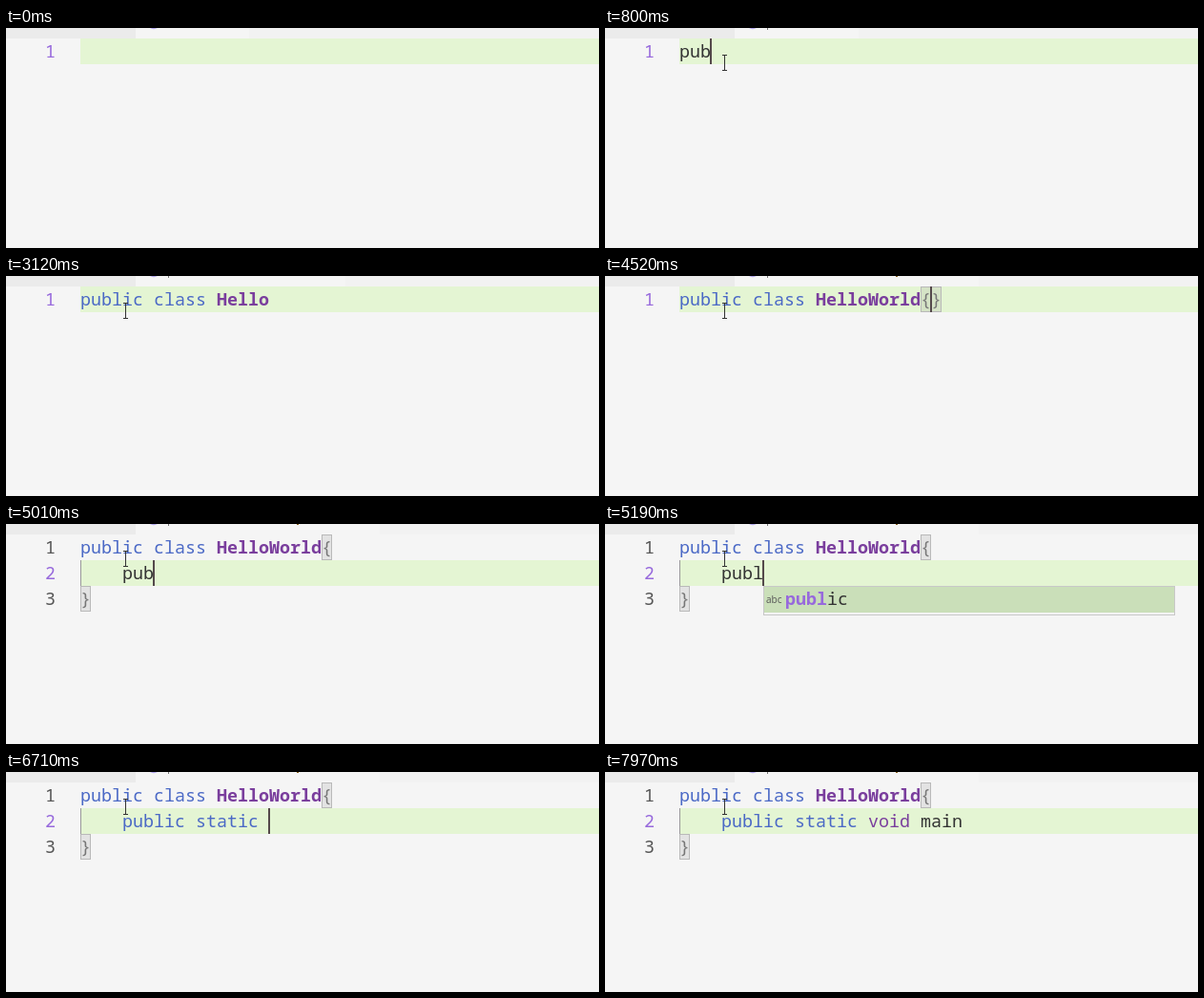
Write an HTML page with a canvas that moves like this. It is 622 px wide and 231 px high and loops after 8 s.

```html
<!DOCTYPE html>
<html lang="en">
<head>
<meta charset="utf-8">
<title>Typing a Java class</title>
<style>
  html, body { margin: 0; width: 100%; height: 100%; overflow: hidden; background: #f5f5f5; }
  canvas { display: block; }
</style>
</head>
<body>
<canvas id="stage" width="622" height="231"></canvas>
<script>
const ctx = document.getElementById("stage").getContext("2d");
const LOOP = 8000, W = 622, H = 231;
const CELL = 11, ROW = 27, LEFT = 78, TOP = 11;
const MONO = '18.33px "Noto Sans Mono", "DejaVu Sans Mono", monospace';
const color = {
  bg: "#f5f5f5", line: "#e4f5d3", text: "#333333", keyword: "#4b69c6",
  type: "#7a3e9d", accent: "#9769dc", brace: "#777777", number: "#555555"
};

const header = "public class HelloWorld";
const headerKeys = [540, 640, 750, 860, 970, 1090, 1340, 1480, 1600, 1760, 1940, 2000,
  2230, 2290, 2370, 2450, 2530, 2610, 3180, 3310, 3480, 3600, 3740];
const method = "public static void main";
const methodKeys = [4790, 4870, 4960, 5080, 5280, 5370, 5650, 5760, 5870, 5960, 6070, 6170, 6290,
  6680, 6900, 7000, 7090, 7180, 7400, 7650, 7730, 7800, 7880];
const OPEN = 4480, CLOSE = 4520, ENTER = 4670;

// start column, end column, time the colour applies, colour, bold
const headerStyles = [[0, 6, 1210, color.keyword], [7, 12, 2170, color.keyword],
  [13, 23, 0, color.type, true]];
const methodStyles = [[0, 6, 5440, color.keyword], [7, 13, 6500, color.keyword],
  [14, 18, 7290, color.type]];
const caretHidden = [[0, 480], [3120, 3180], [4300, 4480], [7970, LOOP]];

const within = (t, a, b) => t >= a && t < b;
const typed = (keys, t) => keys.filter(k => k <= t).length;
const rowTop = row => TOP + row * ROW;

function rect(x, y, w, h, fill) {
  ctx.fillStyle = fill;
  ctx.fillRect(x, y, w, h);
}

function write(text, x, row, fill, bold) {
  ctx.font = (bold ? "bold " : "") + MONO;
  ctx.fillStyle = fill;
  [...text].forEach((ch, i) => ctx.fillText(ch, x + i * CELL, rowTop(row) + 20));
}

function writeStyled(text, x, row, styles, t) {
  [...text].forEach((ch, i) => {
    const s = styles.find(([a, b, at]) => within(i, a, b) && t >= at);
    write(ch, x + i * CELL, row, s ? s[3] : color.text, s && s[4]);
  });
}

function brace(ch, x, row) {
  rect(x, rowTop(row), CELL, ROW, "rgba(110,110,110,.13)");
  ctx.strokeStyle = "#b9b9b9";
  ctx.lineWidth = 1;
  ctx.strokeRect(x + .5, rowTop(row) + .5, CELL - 1, ROW - 1);
  write(ch, x, row, color.brace);
}

function drawTabs(t, count) {
  const chars = count + (t >= OPEN);
  rect(0, 0, W, TOP, "#f2f2f2");
  rect(0, 0, 136, TOP, "#ebebeb");
  rect(136, 0, 119 + Math.max(0, chars * 6 - 7), TOP, color.bg);
  ctx.strokeStyle = "#b5aaf0";
  ctx.lineWidth = 1.3;
  ctx.beginPath();
  ctx.arc(155, -6, 6.5, .2, Math.PI - .2);
  ctx.stroke();
  if (count) rect(170, 0, 1, 2, "#777777");
  if (t >= OPEN) rect(305, 0, 2, 1, "#8a6420");
}

function drawPopup(x, count) {
  const y = rowTop(2);
  rect(x, y, 432, 31, "#c8c8c8");
  rect(x + 1, y + 1, 430, 29, "#f3f3f3");
  rect(x + 1, y + 1, 430, 27, "#cadfb9");
  ctx.font = '10px "Open Sans", sans-serif';
  ctx.fillStyle = "#555555";
  ctx.fillText("abc", x + 3, y + 18);
  const word = method.slice(0, 6);
  write(word.slice(0, count), x + 23, 2, color.accent, true);
  write(word.slice(count), x + 23 + count * CELL, 2, color.text);
}

function drawPointer(t) {
  if (t < 20) return;
  const p = Math.min(1, (t - 20) / 480);
  const rest = (1 - p) ** 2 * (1 + 2 * p);
  const x = Math.round(125 + 82 * rest) + .5, y = Math.round(36 + 141 * rest);
  ctx.strokeStyle = "#333333";
  ctx.lineWidth = 1;
  ctx.beginPath();
  ctx.moveTo(x, y - 7);
  ctx.lineTo(x, y + 8);
  for (const edge of [y - 7.5, y + 8.5]) {
    ctx.moveTo(x - 2.5, edge);
    ctx.lineTo(x + 2.5, edge);
  }
  ctx.stroke();
}

function draw(t) {
  const first = typed(headerKeys, t), second = typed(methodKeys, t);
  const split = t >= ENTER, active = split ? 1 : 0;
  const braceX = LEFT + header.length * CELL, indentX = LEFT + 4 * CELL;
  const caretX = split ? indentX + second * CELL : LEFT + (first + (t >= OPEN)) * CELL;

  rect(0, 0, W, H, color.bg);
  drawTabs(t, first);
  rect(LEFT, rowTop(active), W - LEFT, ROW, color.line);
  for (let row = 0; row < (split ? 3 : 1); row++)
    write(String(row + 1), 41, row, row === active ? color.accent : color.number);

  writeStyled(header.slice(0, first), LEFT, 0, headerStyles, t);
  if (t >= OPEN) brace("{", braceX, 0);
  if (within(t, CLOSE, ENTER)) brace("}", braceX + CELL, 0);
  if (split) {
    rect(LEFT, rowTop(1), 1, ROW, "#999999");
    writeStyled(method.slice(0, second), indentX, 1, methodStyles, t);
    brace("}", LEFT, 2);
  }
  if (within(t, 5190, 5560)) drawPopup(caretX, second);
  if (!caretHidden.some(([a, b]) => within(t, a, b)))
    rect(caretX - 1, rowTop(active), 2, ROW, "#54494b");
  drawPointer(t);
}

const start = performance.now();
function frame() {
  draw((performance.now() - start) % LOOP);
  requestAnimationFrame(frame);
}
draw(0);
requestAnimationFrame(frame);
</script>
</body>
</html>
```
